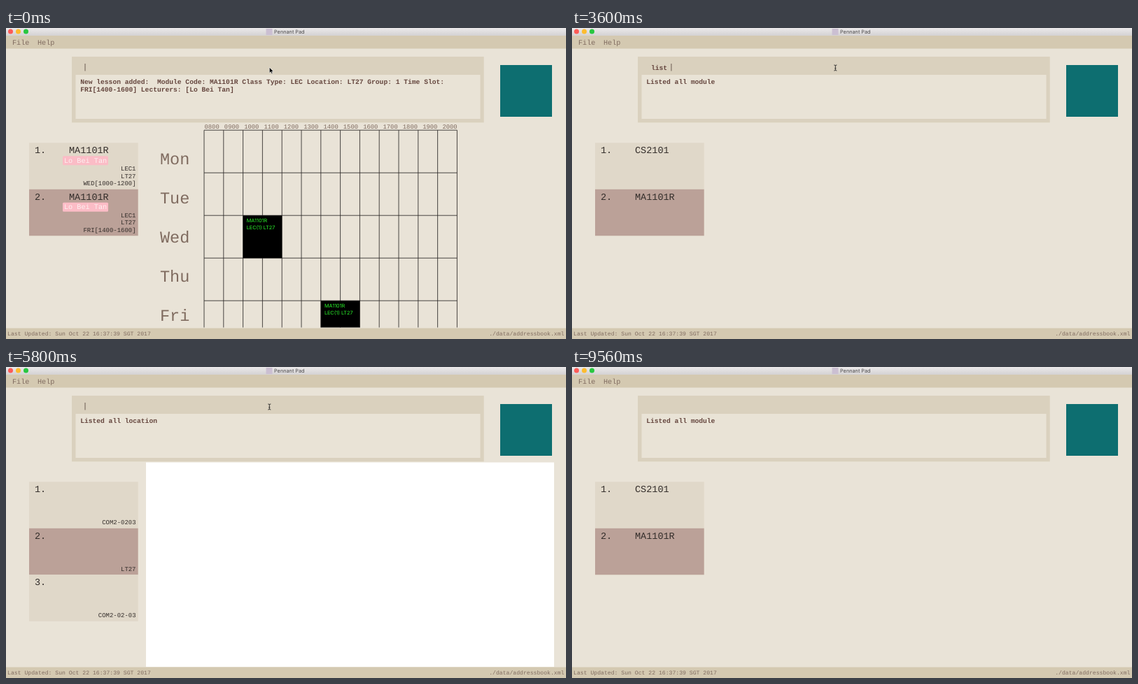
An HTML page for the animation above (9600 ms loop, 800x445 px).

```html
<!DOCTYPE html>
<html lang="en">
<head>
<meta charset="utf-8">
<title>Timetable</title>
<style>
html, body { margin: 0; width: 100%; height: 100%; overflow: hidden; background: #e9e3d7; }
svg { display: block; width: 800px; height: 445px; }
text {
  font-family: "Liberation Mono", "Courier New", monospace;
  white-space: pre;
  text-rendering: geometricPrecision;
}
.sans { font-family: Inter, "Liberation Sans", sans-serif; }
.bold { font-weight: bold; fill: #65463e; }
</style>
</head>
<body>
<svg id="stage" viewBox="0 0 800 445">
  <defs>
    <linearGradient id="bar" x2="0" y2="1">
      <stop offset="0" stop-color="#ebe9ea"/>
      <stop offset="1" stop-color="#d4d2d3"/>
    </linearGradient>
    <clipPath id="body"><rect y="130" width="800" height="298.5"/></clipPath>
  </defs>
</svg>
<script>
const NS = "http://www.w3.org/2000/svg";
const stage = document.getElementById("stage");
const LOOP = 9600;
const INK = "#332d2a", BROWN = "#806c60";
const TUTOR = "Lo Bei Tan";

function add(parent, tag, attrs) {
  const el = document.createElementNS(NS, tag);
  for (const k in attrs) el.setAttribute(k, attrs[k]);
  parent.appendChild(el);
  return el;
}
const group = (attrs = {}) => add(stage, "g", attrs);
const rect = (p, x, y, width, height, fill) => add(p, "rect", { x, y, width, height, fill });
function text(p, x, y, size, fill, str, more = {}) {
  const el = add(p, "text", { x, y, "font-size": size, fill, ...more });
  el.textContent = str;
  return el;
}
const END = { "text-anchor": "end" };

// Window chrome
const chrome = group();
rect(chrome, 0, 0, 800, 445, "#e9e3d7");
rect(chrome, 0, 0, 800, 11, "url(#bar)");
["#fc5b57", "#fdbc2e", "#28c740"].forEach((fill, i) =>
  add(chrome, "circle", { cx: 6.5 + 11 * i, cy: 5, r: 3.5, fill }));
rect(chrome, 371.5, 1, 9, 9, "#cbbfd2");
text(chrome, 383, 7.8, 7.3, "#4a484a", "Pennant Pad", { class: "sans" });
rect(chrome, 0, 11, 800, 18.5, "#d4c9b1");
text(chrome, 9, 23.5, 10.2, BROWN, "File");
text(chrome, 45, 23.5, 10.2, BROWN, "Help");
rect(chrome, 94, 41, 588.7, 94.3, "#dad1be");
rect(chrome, 99.5, 67, 578, 63, "#e9e3d6");
rect(chrome, 706, 53, 74, 74, "#0d6e70");
rect(chrome, 0, 429.5, 800, 15.5, "#d4c9b1");
text(chrome, 2, 440.3, 8.15, BROWN, "Last Updated: Sun Oct 22 16:37:39 SGT 2017");
text(chrome, 797.5, 440.3, 8.15, BROWN, "./data/addressbook.xml", END);

// Left-hand list; the second card is the selected one
function card(p, i, name, lines, tutor) {
  const y = 164.3 + 66.5 * i;
  rect(p, 33, y, 155.7, 66.5, i === 1 ? "#bba198" : "#e0d8c9");
  text(p, 41, y + 14.8, 13.5, INK, i + 1 + ".");
  text(p, 90, y + 14.8, 13.5, INK, name);
  if (tutor) {
    add(p, "rect", { x: 81, y: y + 19, width: 65, height: 13, rx: 1.5, fill: "#fbbcc6" });
    text(p, 83, y + 28.6, 10.2, "#fdeff0", tutor);
  }
  lines.forEach((s, n) =>
    text(p, 185.5, y + 61.1 - 10.5 * (lines.length - 1 - n), 8.95, INK, s, END));
}

// Lessons view with timetable
const lessons = group({ "clip-path": "url(#body)" });
card(lessons, 0, "MA1101R", ["LEC1", "LT27", "WED[1000-1200]"], TUTOR);
card(lessons, 1, "MA1101R", ["LEC1", "LT27", "FRI[1400-1600]"], TUTOR);
const COL = 27.8, ROW = 61, GX = 283, GY = 146.2;
let grid = "";
for (let i = 0; i <= 13; i++) {
  grid += `M${GX + COL * i} ${GY}V429`;
  if (i < 13) {
    const hour = String(8 + i).padStart(2, "0") + "00";
    text(lessons, 283.5 + 28.33 * i, 143.8, 8.85, BROWN, hour);
  }
}
["Mon", "Tue", "Wed", "Thu", "Fri"].forEach((day, i) => {
  grid += `M${GX} ${GY + ROW * i}H${GX + COL * 13}`;
  text(lessons, 220, 195.3 + 56 * i, 23.5, BROWN, day);
});
add(lessons, "path", { d: grid, stroke: "#2c2927", "stroke-width": 0.85, fill: "none" });
function lesson(col, row) {
  const x = GX + COL * col, y = GY + ROW * row;
  rect(lessons, x, y, COL * 2, ROW, "#000");
  ["MA1101R", "LEC(1) LT27"].forEach((s, n) =>
    text(lessons, x + 5.1, y + 10 + 9.8 * n, 7.25, "#2bf52b", s, { class: "sans" }));
}
lesson(2, 2);
lesson(6, 4);

// Modules view
const modules = group();
card(modules, 0, "CS2101", []);
card(modules, 1, "MA1101R", []);

// Locations view
const places = group();
["COM2-0203", "LT27", "COM2-02-03"].forEach((s, i) => card(places, i, "", [s]));
rect(places, 200, 136.5, 583, 292.5, "#fff");

// Command line, result and pointer
const live = group();
const CHAR = 5.78;
const command = text(live, 113, 59.9, 9.63, "", "", { class: "bold" });
const caret = rect(live, 112.5, 51, 1, 10.5, "#6a5a50");
const result = [79.6, 91.1].map(y => text(live, 106.2, y, 9.63, "", "", { class: "bold" }));
const arrow = add(live, "path", {
  d: "M0 0V8.2L1.9 6.5L3.2 9.3L4.6 8.7L3.4 6H5.8Z",
  fill: "#000", stroke: "#fff", "stroke-width": 0.6
});
const beam = add(live, "path", {
  d: "M-2-4Q0-4 0-3Q0-4 2-4M0-3V3M-2 4Q0 4 0 3Q0 4 2 4M-1 .8H1",
  fill: "none", stroke: "#222", "stroke-width": 0.9
});

const LISTED = "Listed all ";
const views = [
  { at: 0, el: lessons, msg: [
    "New lesson added:  Module Code: MA1101R Class Type: LEC Location: LT27 Group: 1 Time Slot:",
    `FRI[1400-1600] Lecturers: [${TUTOR}]`] },
  { at: 2200, el: modules, msg: [LISTED + "module", ""] },
  { at: 5680, el: places, msg: [LISTED + "location", ""] },
  { at: 7600, el: modules, msg: [LISTED + "module", ""] }
];
const typing = [
  { str: "list module", from: 520, step: 115, enter: 2200 },
  { str: "list location", from: 3040, step: 125, enter: 5680 },
  { str: "list module", from: 6120, step: 115, enter: 7600 }
];
const show = (el, on) => el.setAttribute("visibility", on ? "visible" : "hidden");

function render(t) {
  const view = views.filter(v => v.at <= t).pop();
  [lessons, modules, places].forEach(el => show(el, el === view.el));
  result.forEach((el, i) => { el.textContent = view.msg[i]; });

  let str = "", lastKey = view.at;
  const cur = typing.find(c => t >= c.from && t < c.enter);
  if (cur) {
    const n = Math.min(cur.str.length, Math.floor((t - cur.from) / cur.step) + 1);
    str = cur.str.slice(0, n);
    lastKey = cur.from + (n - 1) * cur.step;
  }
  command.textContent = str;
  caret.setAttribute("x", 112.5 + CHAR * str.length);
  show(caret, (t - lastKey) % 1000 < 500);

  // The pointer leaves through the top edge at the end
  const k = Math.min(1, Math.max(0, (t - 9260) / 240));
  const y = 57 - 70 * k * k;
  const isBeam = t >= 2200 && y > 41;
  show(beam, isBeam);
  show(arrow, !isBeam);
  beam.setAttribute("transform", `translate(376.3 ${y})`);
  arrow.setAttribute("transform", `translate(376.3 ${y - 0.8})`);
}

function tick() {
  render(performance.now() % LOOP);
  requestAnimationFrame(tick);
}
tick();
</script>
</body>
</html>
```
